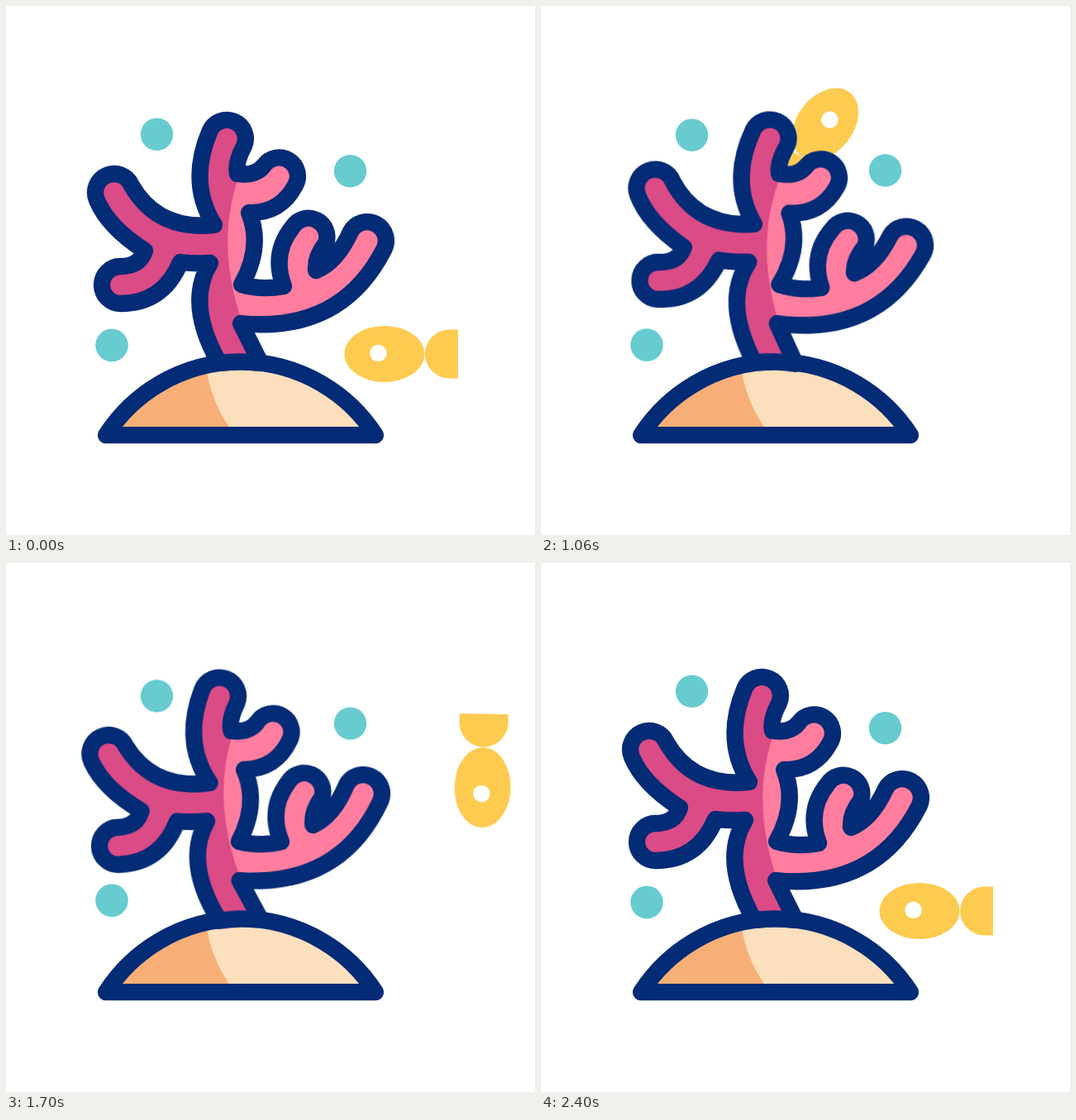
Recreate the animation shown at these times as an HTML page without scripts. Size 640x640 px, loop 2.42 s.

```html
<!DOCTYPE html>
<html lang="en">
<head>
<meta charset="utf-8">
<title>Coral reef</title>
<style>
  html, body { margin: 0; width: 100%; height: 100%; overflow: hidden; background: #fff; }
  svg { display: block; width: 100%; height: 100%; }
  .outline { fill: none; stroke: #042b76; stroke-width: 20.3; stroke-linejoin: round; }
  .fish { fill: #fdcb50; }
  .bubble, .coral { animation: 2420ms cubic-bezier(.333, 0, .667, 1) infinite; }
  .bubble { fill: #67cbd0; animation-name: bob; }
  .coral { transform-origin: 284px 430px; animation-name: sway; }

  /* Every cycle ends with a 20 ms hold. */
  @keyframes bob {
    0%, 49.59%, 99.17%, 100% { transform: none; }
    24.79%, 74.38% { transform: translateY(var(--shift)); }
  }
  @keyframes sway {
    0%, 99.17%, 100% { transform: rotate(0deg); }
    16.53%, 49.59%, 82.64% { transform: rotate(4deg); }
    33.06%, 66.12% { transform: rotate(-3deg); }
  }
</style>
</head>
<body>
<svg viewBox="0 0 640 640">
  <defs>
    <path id="coral" d="M246.5 151.5 A22.5 22.5 0 0 1 288 169.5 Q277 190 280 203 Q302 206 312 193
      A22.5 22.5 0 0 1 350 217 Q332 251 294 250 Q311 291 285 337 Q309 344 336 339 Q321 299 347 267
      A22.5 22.5 0 0 1 387 287 Q374 303 375 320 Q400 310 417 273
      A22.5 22.5 0 0 1 457 295 Q405 396 284 384 L308 432 A194 194 0 0 0 258 432
      Q217 360 247 311 Q229 312 211 310 Q190 360 138.5 360
      A22.5 22.5 0 0 1 138.5 315 Q162 315 168 296 Q124 268 110 235
      A22.5 22.5 0 0 1 151.5 216.5 Q183 272 252 265 Q220 214 246.5 151.5Z"/>
    <path id="dune" d="M121 519.2 A194 194 0 0 1 447 519.2Z"/>
    <clipPath id="in-coral"><use href="#coral"/></clipPath>
    <clipPath id="in-dune"><use href="#dune"/></clipPath>
  </defs>

  <circle class="bubble" cx="182.5" cy="155.3" r="19.7" style="--shift: 6px"/>
  <circle class="bubble" cx="416.5" cy="199.8" r="19.7" style="--shift: -6px"/>
  <circle class="bubble" cx="128" cy="410.4" r="19.8" style="--shift: -2.4px"/>

  <!-- The fish speeds up, cruises over the top, then slows down. -->
  <g class="fish">
    <ellipse rx="48.5" ry="34"/>
    <path d="M89 -29.5 V29.5 H78.5 A29.5 29.5 0 0 1 78.5 -29.5Z"/>
    <circle cx="-7.5" cy="-1" r="10.2" fill="#fff"/>
    <animateMotion dur="2420ms" repeatCount="indefinite" rotate="auto-reverse" calcMode="spline"
      path="M458 421 C436 421 414 421 395.5 409 C360 386 324 361 309 321.5 C285 261 304 194 343.6 143.3
        C387 87 469 104 528 143.7 C580 178 599 307 541 382 C521 407 490 421 458 421"
      keyPoints="0;.405;.62;1;1" keyTimes="0;.438;.5868;.9917;1"
      keySplines=".333 .1 .667 .43;0 0 1 1;.333 .49 .667 .937;0 0 1 1"/>
  </g>

  <use href="#dune" fill="#fcdfbd"/>
  <path d="M121 520 V430 H241 Q247 482 278 520Z" fill="#f7af77" clip-path="url(#in-dune)"/>
  <use href="#dune" class="outline"/>

  <g class="coral">
    <use href="#coral" fill="#db4b86"/>
    <path d="M283 203 Q252 285 286 384 L300 400 H480 V170 H310Z" fill="#ff7d9f" clip-path="url(#in-coral)"/>
    <use href="#coral" class="outline"/>
  </g>
</svg>
</body>
</html>
```
